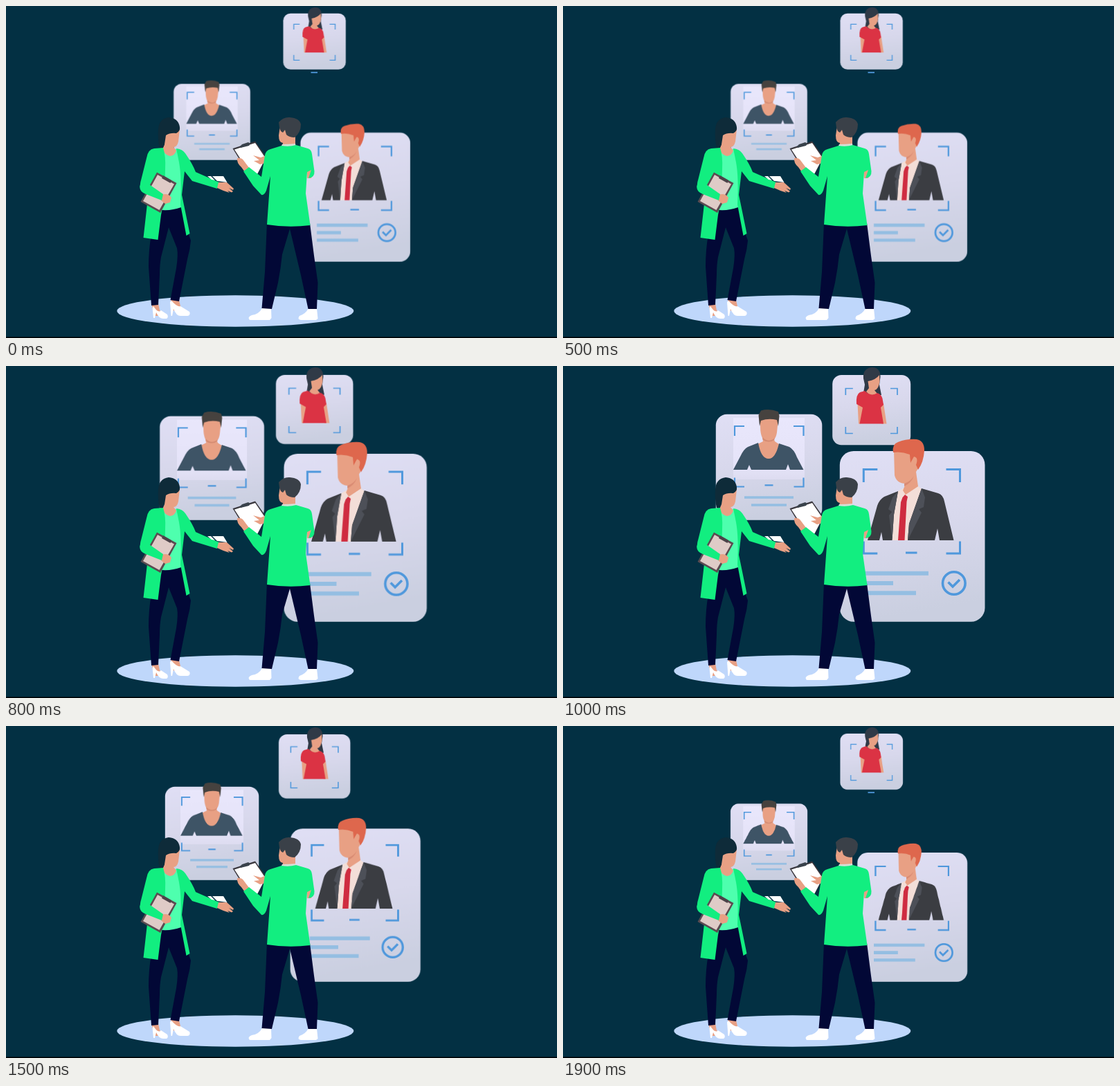
These frames come from a looping animation (796x480 px, 2000 ms). An HTML page:

```html
<!DOCTYPE html>
<html lang="en">
<head>
<meta charset="utf-8">
<title>Candidate cards</title>
<style>
  html, body { margin: 0; width: 100%; height: 100%; overflow: hidden; background: #033043; }
  svg { display: block; width: 100vw; height: 100vh; }
  .marks { fill: none; stroke: #4f98dc; }
  .lines { fill: none; stroke: #94bee2; }
  .skin { fill: #e8a084; }
  .green { fill: #12ee80; }
  .navy { fill: #020836; }
  .white { fill: #fff; }
</style>
</head>
<body>
<svg viewBox="0 0 796 480">
  <defs>
    <linearGradient id="glass" x1="0" y1="0" x2="0.15" y2="1">
      <stop offset="0" stop-color="#e0dff5"/>
      <stop offset="0.5" stop-color="#d8d8ec"/>
      <stop offset="1" stop-color="#cacfe0"/>
    </linearGradient>
    <linearGradient id="photo" x1="0" y1="0" x2="0" y2="1">
      <stop offset="0" stop-color="#e9e7fc"/>
      <stop offset="0.8" stop-color="#e5e3f8"/>
      <stop offset="1" stop-color="#dddcf0"/>
    </linearGradient>
  </defs>

  <rect width="796" height="480" fill="#033043"/>
  <rect y="478.5" width="796" height="1.5" fill="#000"/>
  <ellipse cx="331.3" cy="441" rx="171" ry="22.8" fill="#bfd7fb"/>
  <path class="marks" d="M440.5 96.2h9.5" stroke-width="1.8"/>

  <!-- Cards are drawn at full size -->
  <g id="topCard">
    <rect x="389.2" y="13" width="113" height="101.3" rx="13" fill="url(#glass)"/>
    <path class="marks" stroke-width="1.7" d="M408.3 42v-9.5h10.5M473 32.500h10v9.500M483 88v9.500h-10M418.800 97.500h-10.500v-9.500"/>
    <path fill="#303a47" d="M434 18C433 7 439 2 447 2C455 2 459 8 458.500 16L457 27L460 42L450 43L434 39L436 27Z"/>
    <path class="skin" d="M440.500 22Q452 20 457 13L457.500 22Q456 34 450 35L454 40L452 46L445 44L438 37L442 32Z"/>
    <path class="skin" d="M425.500 54L434 56L430 83.500H427Z M457 55L463 54L467.500 83.500H460Z"/>
    <path fill="#db3344" d="M436 36Q445 45 454 39Q460 41 461.500 47L463 56L459 60L463 83.500H428.500L433 60L424 55Q423 41 429 38Z"/>
  </g>

  <g id="leftCard">
    <rect x="220.800" y="69.800" width="153.500" height="153" rx="16" fill="url(#glass)"/>
    <rect x="246" y="75" width="103" height="89" fill="url(#photo)"/>
    <path class="marks" stroke-width="2.200" d="M248 101v-14h14M333 87h14.500v14M347.500 161.500v13h-14M262 174.500h-14v-13M291.500 172.300h12"/>
    <path class="lines" stroke-width="3.400" d="M262 190h71M272 201h51"/>
    <path class="skin" d="M285 76H311L309 96Q308 103 305 106L306 109L312 113L307 136H287L281 113L289 109L288 104Q285 98 285 88Z"/>
    <path fill="#d48b72" d="M288 103Q297 112 306 104L305 107Q297 112 289 107Z"/>
    <path fill="#3e5466" d="M282 111Q286 134 297 134Q307 134 312 112L327 117Q334 121 338 132L347.500 150H328L325 142L322 150H272L269 143L266 150H246L256 131Q261 120 267 117Z"/>
    <path fill="#46423f" d="M284 87L282.500 71L286 64.500Q298 61 311 66L312.500 72L311 87L309 78Q297 75 286 79Z"/>
  </g>

  <g id="rightCard">
    <rect x="399.800" y="123" width="209.700" height="246.700" rx="20" fill="url(#glass)"/>
    <path class="marks" stroke-width="3" d="M434.300 168v-18.500h20M553.500 149.500h20v18.500M573.500 253.500v17.500h-20M454.300 271h-20v-17.500M495 270h16.500"/>
    <path class="lines" stroke-width="6" d="M431 299.800h97M431 314h46M431 328.300h79"/>
    <g class="marks" stroke-width="3.600">
      <circle cx="564.800" cy="314" r="16.300"/>
      <path d="M556.500 312.500L563 319L573 309"/>
    </g>
    <path fill="#f3ded8" d="M484 181L491 177L512 173L521 180L499 252H474L477 196Z"/>
    <path class="skin" d="M478 122L514 124L513 148L510 153L513 174L495 186L491 180L495 170Q482 170 479 158Z"/>
    <path fill="#d98b73" d="M493 170Q502 167 507 159Q503 169 493 174Z"/>
    <path fill="#cf2c40" d="M490.500 190L494 186L498 189L496.500 196L493.500 252H484L488 197Z"/>
    <path fill="#3b3d42" d="M484 181L464 189Q457 193 454 202L440 252H457L460 240L462 252H475.500L478 215ZM518 177L542 184Q549 186 551 196L564.500 252H544L541 235L537 252H498L500 228Z"/>
    <path fill="#4d5058" d="M484 181L476 190L470 207L475 211L471 216L475.500 252L478 215ZM518 177L523 190L521 204L514 207L518 212L498 252L500 228Z"/>
    <path fill="#de674d" d="M477 125Q475 113 484 110Q497 105 511 106Q522 108 522 122Q521 139 513 150L510 143Q514 132 507 131L502 140L501 128Q489 123 477 125Z"/>
  </g>

  <!-- Woman -->
  <g>
    <path class="skin" d="M210 430H220L222 440L231 448H214ZM238 423L250 425L252 434L260 443L240 440Z"/>
    <path class="white" d="M211.500 436L213 451H215L217 443Q221 452 227 452H232Q235 450 233 446L224 440Q220 445 213 434ZM237 428L238.500 448H240L242 438Q246 448 252 448H263Q267 446 265 442L252 434Q248 436 239 426Z"/>
    <path class="navy" d="M227 293L253 289L258 315L267 339Q266 352 262 366L250 427L237.500 425L246 379Q249 360 247 350L235 320L224 363Q222 374 222 388L220 432L210 433L206 377Q206 352 210 330Z"/>
    <path fill="#4effae" d="M225 206L249 207L254 232L253 291Q240 296 225 295Z"/>
    <path class="skin" d="M228 183L251 178L249 196Q247 204 242 204L246 209Q244 216 237 217Q229 215 226 207L229 200Z"/>
    <path fill="#0e2b39" d="M220 178Q221 163 235 161Q249 162 251 175Q252 181 246 184Q237 183 231 187L229 200L226 207L222 205Q219 193 220 178Z"/>
    <path class="green" d="M227 205Q231 217 230 236L229 276L224 302L219.500 338L198.500 335L204 286L207 263L200 268L193.500 262L195 252L203 220Q205 207 214 206Z"/>
    <path class="green" d="M246 206Q255 207 259 213Q270 229 274 240L308 255L305 264L269 253L258 239L254 273L265.500 329L260.500 332L252 287Q254 248 250 226Z"/>
    <path fill="#5b4b51" d="M218 240.500L246.500 256L223 299L194.500 283Z"/>
    <path fill="#dfcbc7" d="M219 244L243 257.500L221.500 295L198 282Z"/>
    <path fill="#4b4249" d="M227 245L239 252L237.500 256L225 249Z"/>
    <path class="skin" d="M225 273Q234 270 239 277L237 284L230 286L224 281Z"/>
    <path class="green" d="M195 252L207 258L227 272L225 281L202 272Q192 268 193.500 260Z"/>
    <path class="white" d="M291 246H296L302 252L297 251ZM298 246H314L319.500 255L305 253Z"/>
    <path class="skin" d="M307 255L319 255L329 264L328 266L322 263L328 268L326 269.500L320 267L323 270L314 267L305 263Z"/>
  </g>

  <!-- Man -->
  <g>
    <path class="white" d="M370 437H383L383.500 451L381 454H352Q348 450 355 447Q365 446 370 437ZM437 437H449L450.500 452L448 454H426Q420 453 424 448Q433 445 437 437Z"/>
    <path class="navy" d="M377 313L439 314L445 361L450.500 400L449 438H436.500L426 389L410 322L399 359Q397 379 393 400L384 438L369.500 437L374 385Z"/>
    <path class="skin" d="M435 236H443L441 249L435 249Z"/>
    <path fill="#39363c" d="M327.500 206L360 195.500L376.500 219L363 244L348 239Z"/>
    <path class="white" d="M330 207.500L360 198L375 220L363 243L349 237Z"/>
    <path fill="#39424b" d="M338 203L341 200L350 197L353 199L351 202L339 205Z"/>
    <path class="skin" d="M334 220Q340 219 343 223L352 235L345 240L340 233Q333 227 334 220ZM357 216L368 219L376 216L375 227L367 229L358 224L366 223Z"/>
    <path class="skin" d="M396 174L415 174L418 188L418 202Q408 205 399 202L400 198Q394 198 394 187Z"/>
    <path fill="#d5ded9" d="M399 200Q409 200 418 199L419 204H397Z"/>
    <path class="green" d="M398 202Q409 204 419 201L436 206Q441 207 442 214L445.500 239Q446 248 437 249L441 237L435 240L433 271L439.500 317Q408 321 377 316L382 246L376 267Q373 274 369 273L357 260L343 239L351 233L369 247L374 216Q375 209 382 207Z"/>
    <path fill="#3a4048" d="M395 176L394 168Q401 160 410 161Q424 162 426 171Q426 183 417 190Q409 190 405 186L403 179L400 183L397 181Z"/>
  </g>
</svg>
<script>
  const LOOP = 2000, STEP = 100;
  const cards = [
    { id: "topCard", origin: "445.750px 2px", small: 0.8 },
    { id: "leftCard", origin: "297.500px 223px", small: 0.7215 },
    { id: "rightCard", origin: "504.750px 370px", small: 0.7565 }
  ];

  const clamp = v => Math.min(1, Math.max(0, v));
  const remaining = (t, start, length) => (1 - clamp((t - start) / length)) ** 3;

  // 0 is the small pose, 1 the large one
  const growth = t => t < 1400 ? 1 - remaining(t, 500, 500) : remaining(t, 1400, 600);

  for (const { id, origin, small } of cards) {
    const card = document.getElementById(id);
    card.style.transformOrigin = origin;
    const frames = [];
    for (let t = 0; t <= LOOP; t += STEP) {
      const scale = small + (1 - small) * growth(t);
      frames.push({ offset: t / LOOP, transform: `scale(${scale})`, easing: "step-end" });
    }
    card.animate(frames, { duration: LOOP, iterations: Infinity });
  }
</script>
</body>
</html>
```
